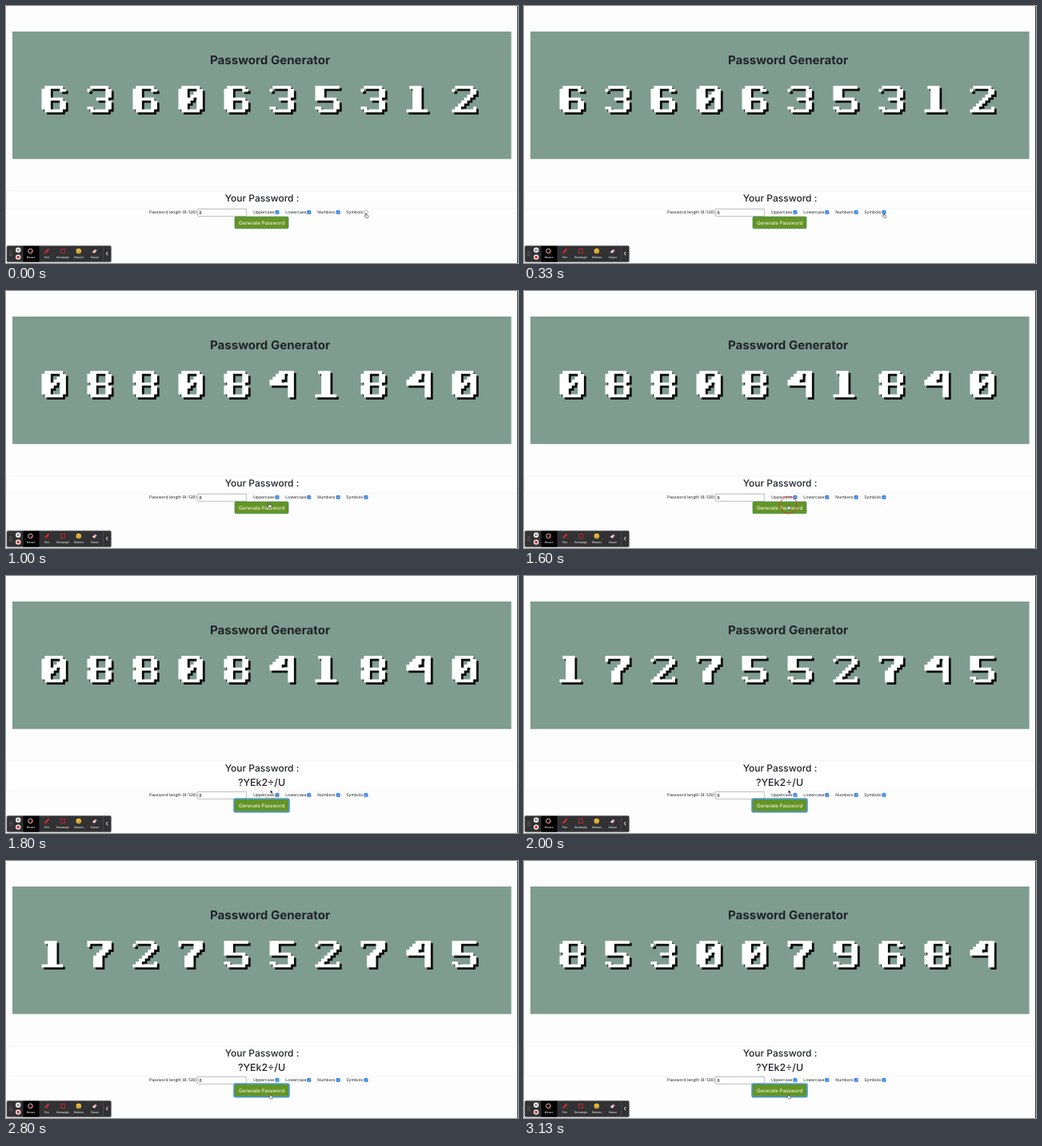
Animation of 640 by 322 pixels, one loop 3200 ms. Source, as an HTML page:

```html
<!DOCTYPE html>
<html lang="en">
<head>
<meta charset="utf-8">
<title>Password Generator</title>
<style>
  html, body { margin: 0; width: 100%; height: 100%; overflow: hidden; background: #fdfdfd; }
  svg { display: block; width: 640px; height: 322px; font-family: Inter, sans-serif; text-rendering: geometricPrecision; }
  .mid { text-anchor: middle; }
  .label { font-size: 5.1px; fill: #212529; }
  .tool { font-size: 3.3px; fill: #eee; text-anchor: middle; font-weight: 500; }
</style>
</head>
<body>
<svg viewBox="0 0 640 322" xmlns="http://www.w3.org/2000/svg">
  <rect width="640" height="322" fill="#fdfdfd"/>
  <rect x="8" y="32" width="623.6" height="159.7" fill="#7f9c90"/>
  <text class="mid" x="330" y="73.2" font-size="15.1" font-weight="650" fill="#212529">Password Generator</text>
  <g id="digits"></g>

  <rect id="panel" x=".5" y="231.7" width="638.5" height="21.6" fill="#fefefe" stroke="#dcdcdc" stroke-width=".6" stroke-dasharray="1 1"/>
  <text class="mid" x="320" y="244.8" font-size="12" font-weight="500" fill="#212529">Your Password :</text>
  <text id="secret" class="mid" x="319.5" y="263.2" font-size="12.4" font-weight="500" fill="#212529">?YEk2÷/U</text>

  <g id="form">
    <text class="label" x="179" y="260.3">Password length (8-128):</text>
    <rect x="239.8" y="254.2" width="60.4" height="9" fill="#fff" stroke="#8a8a8a" stroke-width=".55"/>
    <text class="label" x="241.2" y="260.8" style="font-size:5.8px">8</text>
    <g id="checks"></g>
    <rect id="focus" x="285" y="263" width="69" height="16.8" rx="2" fill="none" stroke="#4a94e8" stroke-width="1.6"/>
    <rect x="286" y="264" width="67" height="14.8" rx="1.4" fill="#659425" stroke="#2f8a50" stroke-width=".7"/>
    <text class="mid" x="319.6" y="273.8" font-size="6.2" fill="#fff">Generate Password</text>
  </g>

  <g id="toolbar">
    <rect x="1" y="300.4" width="130.4" height="20.4" rx="1.6" fill="#323234" stroke="#6c6c6c" stroke-width=".7"/>
    <rect x="21.5" y="300.8" width="20" height="19.8" fill="#000"/>
    <path d="M121.5 300.8v19.6" stroke="#555" stroke-width=".6"/>
    <path d="M5 307.5v6M7 307.5v6" stroke="#999" stroke-width=".9" stroke-dasharray=".9 1.5"/>
    <circle cx="15.2" cy="305.7" r="3.2" fill="#f4f4f4"/>
    <path d="M14.4 304.4v2.6M16 304.4v2.6" stroke="#333" stroke-width=".8"/>
    <circle cx="15.2" cy="314.6" r="3.2" fill="#f4f4f4"/>
    <rect x="13.6" y="313" width="3.2" height="3.2" rx=".6" fill="#df2b2b"/>
    <circle cx="30.5" cy="307" r="2.8" fill="none" stroke="#f0d8d8" stroke-width=".9"/>
    <path d="M30.4 306.4l4 1.7-1.7.7-.7 1.8z" fill="#e03a3a"/>
    <path d="M52.6 303.8l1.5 1.2-3.6 4.4-2 .8.4-2z" fill="#e02b35"/>
    <rect x="68.5" y="304.5" width="5" height="5" fill="none" stroke="#c8232d" stroke-width=".9"/>
    <circle cx="90.8" cy="307" r="3.2" fill="#f2c23a"/>
    <path d="M89.6 305.6v1M92 305.6v1M89 308q1.8 1.8 3.6 0" fill="none" stroke="#6a4310" stroke-width=".6"/>
    <path d="M108 308.2l3-3.4 2.8 1.3-3 3.4z" fill="#efa3ad"/>
    <path d="M108 308.2l1-1.2 2.8 1.4-1 1.1z" fill="#f4f4f4"/>
    <path d="M127.3 308l-2 2.2 2 2.2" fill="none" stroke="#fff" stroke-width="1"/>
  </g>
  <rect x="639" width="1" height="322" fill="#3a3a3a"/>

  <circle id="ring" r="10.8" fill="none" stroke="#d3302f" stroke-width=".8"/>
  <path id="arrow" d="M0 0v4.6l1.1-1 .8 1.8.9-.4-.8-1.7h1.5z" fill="#111" stroke="#fff" stroke-width=".4"/>
  <path id="hand" d="M-.6 0q.6-.7 1.1 0v1.8l2.1.6q.6.3.4 1.2l-.5 1.8h-2.7l-1.8-2.4q.2-.8 1.4 0z" fill="#fff" stroke="#111" stroke-width=".5"/>
</svg>
<script>
const $ = id => document.getElementById(id);
const LOOP = 3200, STEP = 1000 / 15;

function add(parent, tag, attrs, text) {
  const el = document.createElementNS("http://www.w3.org/2000/svg", tag);
  for (const key in attrs) el.setAttribute(key, attrs[key]);
  if (text) el.textContent = text;
  return parent.appendChild(el);
}

// Strokes of the blocky numerals on an 8 x 9 grid
const part = {
  T: "M1 0h6v1h-6z", F: "M0 0h8v1h-8z", B: "M1 8h6v1h-6z",
  M: "M1 4h6v1h-6z", m: "M3 4h4v1h-4z",
  L: "M0 1h3v3h-3z", l: "M0 5h3v3h-3z", R: "M6 1h2v3h-2z", r: "M6 5h2v3h-2z",
  k: "M0 4h1v1h-1z", K: "M7 4h1v1h-1z",
  t: "M0 1h1v1h-1z", q: "M6 1h2v1h-2z", b: "M0 7h2v1h-2z",
  O: "M0 1h3v7h-3zM6 1h2v7h-2zM5 2h1v2h-1v1h-1v1h-1v-2h1v-1h1z",
  I: "M1 0h4v8h2v1h-7v-1h2v-7h-1z",
  Z: "M6 1h2v2h-1v1h-1v1h-1v1h-1v1h-1v1h5v1h-8v-1h1v-1h1v-1h1v-1h1v-1h1v-1h1zM7 7h1v1h-1z",
  Y: "M3 0h5v9h-2v-4h-6v-2h1v-1h1v-1h1zM5 1h1v3h-2v-1h1z",
  V: "M0 0h8v3h-1v1h-1v1h-1v4h-3v-4h1v-1h1v-1h1v-2h-5z"
};
const shapes = ["TOB", "I", "TtZ", "TtRmrBb", "Y", "FLkMrBb", "TqLkMlrB", "Vt", "TLRMlrB", "TLRMKrBb"]
  .map(s => [...s].map(c => part[c]).join(""));

const slots = Array.from({ length: 10 }, (_, i) => [["#0b0d0c", 2.8], ["#fff", 0]].map(([fill, off]) =>
  add($("digits"), "path", {
    fill, "fill-rule": "evenodd",
    transform: `translate(${44.5 + 57 * i + off} ${100 + off}) scale(3.8 3.7)`
  })));

// Step at which each number comes up
const numbers = [[0, "6360635312"], [15, "0880841840"], [30, "1727552745"], [43, "8530079684"]];

const boxes = [["Uppercase:", 309, 339], ["Lowercase:", 349.3, 378.8], ["Numbers:", 389.3, 415.2], ["Symbols:", 425.3, 450]]
  .map(([name, x, cx]) => {
    add($("checks"), "text", { class: "label", x, y: 260.3 }, name);
    const box = add($("checks"), "rect", { x: cx - 2.2, y: 256.2, width: 4.4, height: 4.4, rx: .8, "stroke-width": .5 });
    const tick = add($("checks"), "path", { d: `M${cx - 1.2} 258.4l.9 1 1.6-2.1`, fill: "none", stroke: "#fff", "stroke-width": .7 });
    return { box, tick };
  });

["Mouse", "Pen", "Rectangle", "Stickers", "Eraser"].forEach((name, i) =>
  add($("toolbar"), "text", { class: "tool", x: 31 + 20 * i, y: 315.6 }, name));

// Pointer path: step, x, y
const route = [[0, 450, 260], [8, 450, 260], [9, 434, 261], [11, 364.5, 263.5], [13, 337, 265.5], [15, 329, 266],
  [16, 329.5, 266.5], [19, 330.5, 268], [30, 330.5, 268], [33, 330.5, 289], [36, 330.5, 289], [39, 330.5, 292.5], [48, 330.5, 292.5]];

function pointer(k) {
  const i = Math.max(1, route.findIndex(p => p[0] >= k));
  const [a, x, y] = route[i - 1], [b, u, v] = route[i];
  const f = (k - a) / (b - a);
  return [x + (u - x) * f, y + (v - y) * f];
}

function setCheck({ box, tick }, on) {
  box.setAttribute("fill", on ? "#2878e0" : "#fff");
  box.setAttribute("stroke", on ? "#2878e0" : "#777");
  tick.style.opacity = on ? 1 : 0;
}

const show = (id, on) => { $(id).style.opacity = +on; };

function draw(t) {
  const k = Math.floor((t + 7) / STEP);
  const value = numbers.filter(n => n[0] <= k).pop()[1];
  slots.forEach((pair, i) => pair.forEach(p => p.setAttribute("d", shapes[value[i]])));

  const done = k >= 26;
  $("panel").setAttribute("height", done ? 37.6 : 21.6);
  $("form").setAttribute("transform", `translate(0 ${done ? 16 : 0})`);
  show("secret", done);
  show("focus", k >= 25);
  boxes.forEach((b, i) => setCheck(b, i < 3 || k >= 2));

  const [x, y] = pointer(k);
  const overButton = y > (done ? 280 : 264.5) && x < 353;
  const hand = k < 9 || overButton;
  for (const id of ["arrow", "hand", "ring"]) $(id).setAttribute("transform", `translate(${x} ${y})`);
  show("hand", hand);
  show("arrow", !hand);

  const age = k >= 24 ? k - 24 : k - 1;
  show("ring", age >= 0 && age < 4 ? 1 - age * .22 : 0);
}

function frame(now) {
  draw(now % LOOP);
  requestAnimationFrame(frame);
}
draw(0);
requestAnimationFrame(frame);
</script>
</body>
</html>
```
